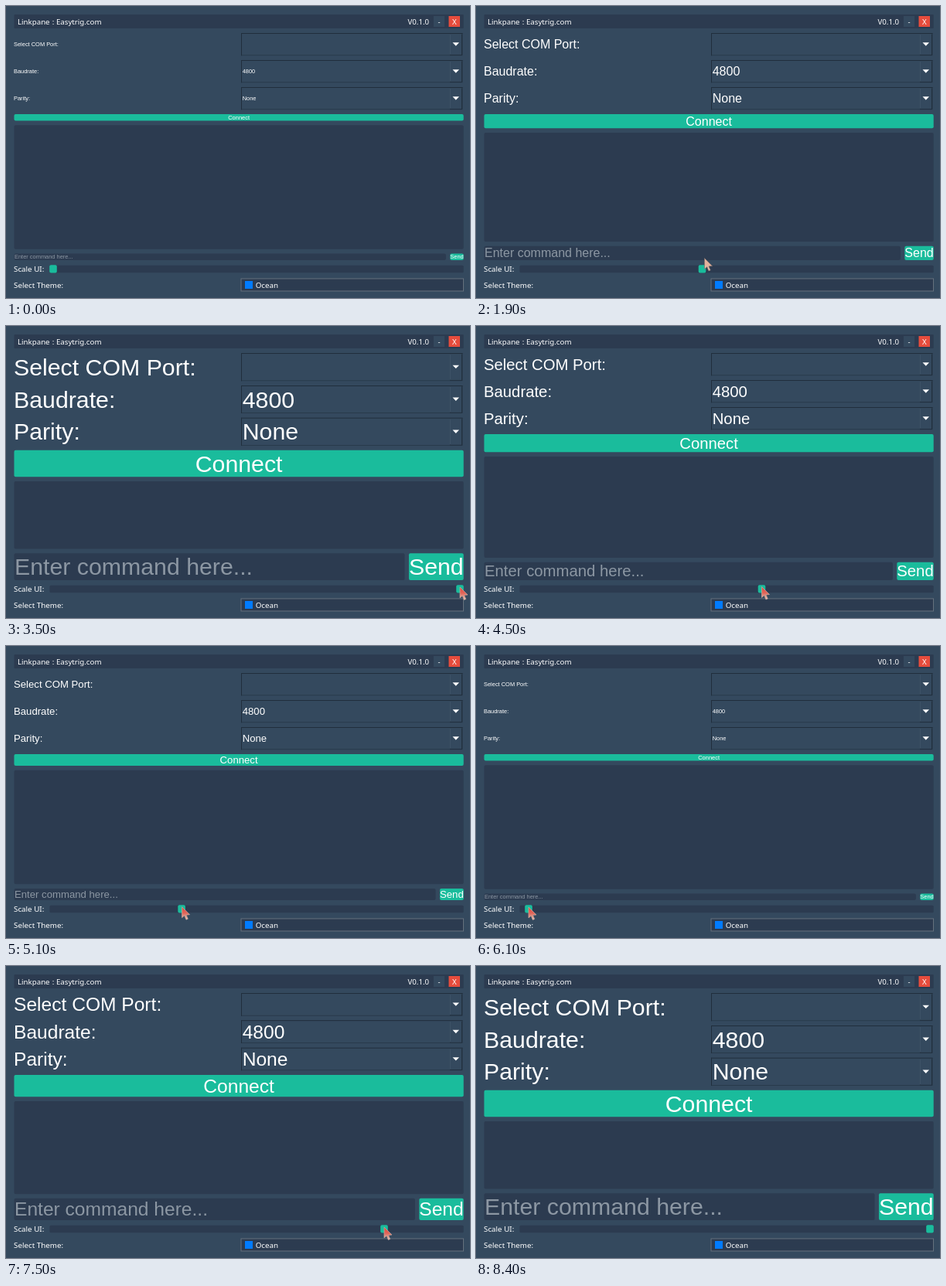
Write an HTML page with a canvas that moves like this. It is 600 px wide and 378 px high and loops after 9.3 s.

```html
<!DOCTYPE html>
<html lang="en">
<head>
<meta charset="utf-8">
<title>Serial terminal</title>
<style>
html, body { margin: 0; width: 100%; height: 100%; overflow: hidden; background: #34495e; }
canvas { display: block; }
</style>
</head>
<body>
<canvas id="stage" width="600" height="378"></canvas>
<script>
const ctx = document.getElementById("stage").getContext("2d");
const LOOP = 9300, STEP = 100;
const LEFT = 10.5, RIGHT = 591.7, GAP = 5.7;
const BACK = "#34495e", PANEL = "#2c3b50", GREEN = "#1abc9c", WHITE = "#fff";
const SANS = '"Liberation Sans", Arial, sans-serif';
const UI = '"Noto Sans", Tahoma, sans-serif';

// time, slider handle x, pointer tip x, pointer tip y
const path = [
  [0, 61, 62, 348], [1000, 61, 62, 348], [1900, 292.5, 295.5, 326.5],
  [2200, 366, 367, 337], [3100, 587, 587, 338], [3600, 587, 587, 338],
  [4500, 369.5, 369.5, 337.5], [5800, 61, 62, 338], [6000, 61, 62, 338],
  [6100, 68, 68, 338], [7500, 489, 489, 338], [7800, 587, 587, 338],
  [8000, 587, 591, 338], [8400, 587, 606, 332], [LOOP, 587, 606, 332]
];

function poseAt(t) {
  const i = path.findIndex(key => key[0] > t);
  const a = path[i - 1], b = path[i];
  const u = (t - a[0]) / (b[0] - a[0]);
  const [, handle, x, y] = a.map((v, n) => v + (b[n] - v) * u);
  return { handle, x, y };
}

function box(x, y, w, h, color, radius = 0) {
  ctx.fillStyle = color;
  ctx.beginPath();
  ctx.roundRect(x, y, w, h, radius);
  ctx.fill();
}

function text(str, x, centerY, size, { font = SANS, color = WHITE, align = "left" } = {}) {
  ctx.font = `${size}px ${font}`;
  ctx.fillStyle = color;
  ctx.textAlign = align;
  ctx.fillText(str, x, centerY + size * 0.347);
}

function polygon(points, color) {
  ctx.fillStyle = color;
  ctx.beginPath();
  points.forEach(([x, y]) => ctx.lineTo(x, y));
  ctx.closePath();
  ctx.fill();
}

function titleBar() {
  const opts = { font: UI };
  box(LEFT, 11, RIGHT - LEFT, 18, PANEL, 1);
  text("Linkpane", 15, 20.3, 9.7, opts);
  text(": Easytrig.com", 59.8, 20.3, 9.7, opts);
  text("V0.1.0", 519.5, 20.3, 9.7, opts);
  box(553, 13, 14, 14, BACK);
  text("-", 560, 20.3, 9.7, { font: UI, align: "center" });
  box(572.5, 13, 14.5, 14, "#e74c3c");
  text("X", 579.8, 20.3, 9.7, { font: UI, align: "center" });
}

function comboRow(label, value, y, h, size) {
  const mid = y + h / 2, dark = "#202e3c";
  text(label, LEFT - 0.5, mid, size);
  box(304, y, 286.5, h, "#283a4b");
  box(304, y, 286.5, 1, dark);
  box(304, y, 1, h, dark);
  box(305, y + 1, 284.5, h - 2, BACK);
  box(574, y + 1.5, 16, h - 2, dark);
  box(574, y + 1.5, 15, h - 3, "#3d5266");
  box(575, y + 1.5, 14, h - 3, BACK);
  text(value, 305.7, mid, size);
  polygon([[577.5, mid - 2.4], [586, mid - 2.4], [581.75, mid + 2]], WHITE);
}

function button(label, x, y, w, h, size) {
  box(x, y, w, h, GREEN, 2);
  text(label, x + w / 2, y + h / 2, size, { align: "center" });
}

function form(size) {
  const lineH = size * 1.145;
  const rowH = Math.max(29.3, lineH + 1.5);
  const rows = [["Select COM Port:", ""], ["Baudrate:", "4800"], ["Parity:", "None"]];
  let y = 35;
  for (const [label, value] of rows) {
    comboRow(label, value, y, rowH, size);
    y += rowH + GAP;
  }
  button("Connect", LEFT, y, RIGHT - LEFT, lineH, size);
  y += lineH + GAP;

  const inputY = 329 - lineH, sendW = size * 2.335;
  box(LEFT, y, RIGHT - LEFT, inputY - GAP - y, PANEL, 2);
  box(LEFT, inputY, RIGHT - sendW - 5.4 - LEFT, lineH, PANEL, 2);
  text("Enter command here...", 11, inputY + lineH / 2, size, { color: "#8c97a3" });
  button("Send", RIGHT - sendW, inputY, sendW, lineH, size);
}

function footer(handle) {
  text("Scale UI:", 10, 341, 9.8, { font: UI });
  box(56.5, 335.8, RIGHT - 56.5, 9.4, PANEL, 1.5);
  box(handle - 4.8, 335.2, 9.6, 10.4, GREEN, 2);
  text("Select Theme:", 10, 361.3, 9.8, { font: UI });
  box(303.5, 352.5, 288.5, 17, "#65717d");
  box(304.5, 353.5, 286.5, 15, PANEL);
  box(309, 356, 10, 10, "#007bff");
  text("Ocean", 322.7, 361.3, 9.8, { font: UI });
}

function pointer(x, y, pressed) {
  const shape = [[0, 0], [0, 14], [3.2, 11.2], [5.4, 16.5], [7.7, 15.5], [5.5, 10.4], [10, 10]];
  const fill = ctx.createLinearGradient(0, 0, 0, 16);
  fill.addColorStop(0, pressed ? "#e5483f" : "#e3b09b");
  fill.addColorStop(0.5, pressed ? "#e0665a" : "#e3b09b");
  fill.addColorStop(1, "#e6c3b3");
  ctx.save();
  ctx.translate(x, y);
  polygon(shape, fill);
  ctx.strokeStyle = pressed ? "#c9a69c" : "#80706c";
  ctx.lineWidth = 0.7;
  ctx.stroke();
  ctx.restore();
}

function draw(now) {
  const t = Math.floor((now % LOOP) / STEP) * STEP;
  const { handle, x, y } = poseAt(t);
  // The text grows in sixteen equal steps along the slider.
  const level = Math.max(0, Math.floor((handle - 65) / 522 * 16));
  box(0, 0, 600, 378, BACK);
  titleBar();
  form(7.45 + level * 1.428);
  footer(handle);
  if (t >= 100 && t < 8400) pointer(x, y, t >= 2200 && t < 7900);
}

const start = performance.now();
function tick() {
  draw(performance.now() - start);
  requestAnimationFrame(tick);
}
tick();
</script>
</body>
</html>
```
